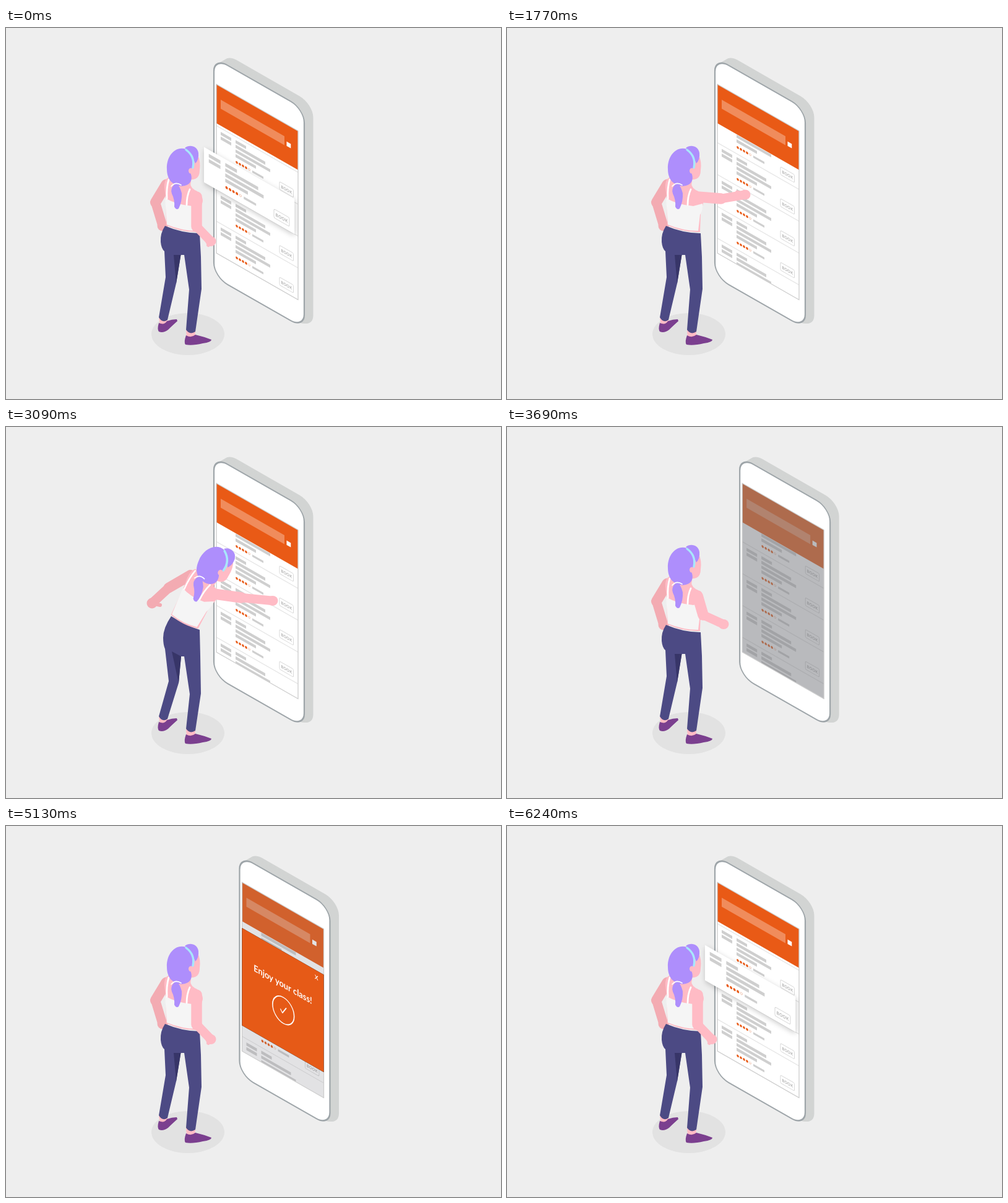
Animation, 800 px wide and 600 px high, one loop 6300 ms. Source, as an HTML page with a canvas:

```html
<!DOCTYPE html>
<html lang="en">
<head>
<meta charset="utf-8">
<title>Booking a class</title>
<style>
html, body { margin: 0; width: 100%; height: 100%; overflow: hidden; background: #eee; }
canvas { display: block; }
</style>
</head>
<body>
<canvas id="stage" width="800" height="600"></canvas>
<script>
const ctx = document.getElementById('stage').getContext('2d');
const LOOP = 6300, STEP = 30;
const SLOPE = 0.572;   // rise of the isometric plane
const ISO = 0.866;     // horizontal foreshortening on that plane
const ROW = 51.5, LIST_TOP = 67, SCREEN_W = 132, SCREEN_H = 273;
const ORANGE = '#e95a16', SKIN = '#ffbbc5', SKIN_DARK = '#f3abb2', PANTS = '#4c4a84',
      PANTS_DARK = '#373568', HAIR = '#ae8efc', SHOE = '#7b3f8f', BAR = '#cfcfcf';

// ---------- timing ----------
const lerp = (a, b, p) => a + (b - a) * p;
const clamp = p => Math.max(0, Math.min(1, p));
const quad = p => p < .5 ? 2 * p * p : 1 - 2 * (1 - p) ** 2;
const cubic = p => p < .5 ? 4 * p ** 3 : 1 - 4 * (1 - p) ** 3;
const ramp = (t, a, b, ease = cubic) => ease(clamp((t - a) / (b - a)));
const pulse = (t, a, b, c, d, ease) => ramp(t, a, b, ease) - ramp(t, c, d, ease);
const outCubic = p => 1 - (1 - p) ** 3;

// keys: [time, ...values]
function track(t, keys) {
  let i = 0;
  while (i < keys.length - 2 && t >= keys[i + 1][0]) i++;
  const a = keys[i], b = keys[i + 1], p = ramp(t, a[0], b[0], quad);
  return a.slice(1).map((v, n) => lerp(v, b[n + 1], p));
}

// ---------- drawing helpers ----------
function fill(d, color) {
  ctx.fillStyle = color;
  ctx.fill(new Path2D(d));
}

function line(d, color, width) {
  ctx.strokeStyle = color;
  ctx.lineWidth = width;
  ctx.lineCap = ctx.lineJoin = 'round';
  ctx.stroke(new Path2D(d));
}

function box(x, y, w, h, color) {
  ctx.fillStyle = color;
  ctx.fillRect(x, y, w, h);
}

function rounded(x, y, w, h, r) {
  ctx.beginPath();
  ctx.roundRect(x, y, w, h, r);
}

function oval(x, y, rx, ry, color) {
  ctx.beginPath();
  ctx.ellipse(x, y, rx, ry, 0, 0, Math.PI * 2);
  ctx.fillStyle = color;
  ctx.fill();
}

function label(text, x, y, font, color, spacing = '0px') {
  ctx.save();
  ctx.translate(x, y);
  ctx.scale(ISO, 1);
  ctx.font = font;
  ctx.letterSpacing = spacing;
  ctx.textAlign = 'center';
  ctx.fillStyle = color;
  ctx.fillText(text, 0, 0);
  ctx.restore();
}

// Draws inside a plane that leans with the phone.
function plane(x, y, scale, draw) {
  ctx.save();
  ctx.transform(scale, SLOPE * scale, 0, scale, x, y);
  draw();
  ctx.restore();
}

// ---------- phone ----------
function drawRow(y) {
  box(7, y + 6, 17, 5, BAR);
  box(7, y + 13.5, 17, 5, BAR);
  [17, 48, 56, 33].forEach((w, i) => box(31, y + 5.5 + i * 7.6, w, 4.9, BAR));
  for (let i = 0; i < 4; i++) oval(33 + i * 5, y + 40.5, 1.8, 2, ORANGE);
  ctx.beginPath();
  ctx.ellipse(53, y + 40.5, 1.5, 1.7, 0, 0, Math.PI * 2);
  ctx.strokeStyle = '#efc0aa';
  ctx.lineWidth = .7;
  ctx.stroke();
  box(58, y + 39, 18, 3.6, BAR);
  rounded(102, y + 32, 22.5, 12.8, 2);
  ctx.fillStyle = '#fff';
  ctx.fill();
  ctx.strokeStyle = '#d6d6d6';
  ctx.lineWidth = .9;
  ctx.stroke();
  label('BOOK', 113.4, y + 41, 'bold 6.4px Lato, sans-serif', '#acacac', '0.4px');
}

function drawScreen(s) {
  ctx.save();
  ctx.beginPath();
  ctx.rect(0, 0, SCREEN_W, SCREEN_H);
  ctx.clip();
  box(0, 0, SCREEN_W, SCREEN_H, '#fff');
  for (let i = 0; i < 7; i++) {
    const y = LIST_TOP + i * ROW - s.scroll;
    if (y > SCREEN_H || y < -ROW) continue;
    box(0, y - .7, SCREEN_W, 1.4, '#e6e6e6');
    if (i !== 1 || s.lift === 0) drawRow(y);
  }
  box(0, 0, SCREEN_W, 63, ORANGE);
  box(7, 21, 103, 14.5, 'rgba(255,255,255,.3)');
  box(113.5, 27.6, 6.8, 7.2, '#fff');
  if (s.dim > 0) box(0, 0, SCREEN_W, SCREEN_H, `rgba(121,123,128,${.52 * s.dim})`);
  ctx.restore();
  ctx.strokeStyle = '#cdcdcd';
  ctx.lineWidth = 1.3;
  ctx.strokeRect(0, 0, SCREEN_W, SCREEN_H);
}

function drawPhone(s) {
  const x = 340 + s.shift, y = 91;
  for (let i = 10; i > 0; i--) {
    const p = i / 10;
    plane(x + 14.5 * p, y - 8.5 * p, 1, () => {
      rounded(-4, -41, 146, 354.5 + 10 * p, 22);
      ctx.fillStyle = '#d2d4d3';
      ctx.fill();
    });
  }
  plane(x, y, 1, () => {
    rounded(-4, -41, 146, 354.5, 22);
    ctx.fillStyle = '#fff';
    ctx.fill();
    ctx.strokeStyle = '#9ea5a9';
    ctx.lineWidth = 2.2;
    ctx.stroke();
    drawScreen(s);
  });
}

function drawCard(s) {
  if (s.lift <= 0) return;
  const x = 340 + s.shift - 20 * s.lift;
  const y = 91 + LIST_TOP + ROW - s.scroll - 17 * s.lift;
  plane(x, y, 1 + .108 * s.lift, () => {
    ctx.save();
    ctx.shadowColor = `rgba(0,0,0,${.21 * s.lift})`;
    ctx.shadowBlur = 8;
    ctx.shadowOffsetX = 1;
    ctx.shadowOffsetY = 3;
    box(0, 0, SCREEN_W, ROW, '#fff');
    ctx.restore();
    drawRow(0);
  });
}

function drawPopup(s) {
  if (s.popAlpha <= 0) return;
  const p = s.popLift, w = SCREEN_W, h = 157.5;
  const x = 340 + s.shift - 36.5 * p, y = 165 - 22 * p, scale = 1 + .113 * p;
  ctx.save();
  ctx.globalAlpha = s.popAlpha;
  for (let i = 4; i > 0 && p > 0; i--) {
    plane(x + .6 * i * p, y - .4 * i * p, scale, () => box(0, 0, w, h, '#596266'));
  }
  plane(x, y, scale, () => {
    box(0, 0, w, h, ORANGE);
    label('Enjoy your class!', 66, 58.5, 'bold 14.8px Lato, sans-serif', '#fff');
    ctx.beginPath();
    ctx.ellipse(66.8, 95, 17.4, 21, 0, 0, Math.PI * 2);
    ctx.strokeStyle = '#fff';
    ctx.lineWidth = 1.6;
    ctx.stroke();
    line('M62.3,95.5L65.2,100L71.3,89', '#fff', 1.4);
    line('M118.2,8.2L122.2,14.2M122.2,8.2L118.2,14.2', '#fff', 1.1);
  });
  ctx.restore();
}

// ---------- woman ----------
function limb(a, b, c, color, upper, lower) {
  line(`M${a}L${b}`, color, upper);
  line(`M${b}L${c}`, color, lower);
}

function drawLegs(p) {
  const m = (x, y, x2, y2) => `${lerp(x, x2, p)},${lerp(y, y2, p)}`;
  fill('M247,469L261,472L260,480L249,481Z', SKIN);
  fill('M291,489L306,491L305,501L292,501Z', SKIN);
  fill('M247,477Q244,487 247,491Q254,494 262,488Q268,482 277,474L276,471Q268,471 260,474Q256,481 247,477Z', SHOE);
  fill('M291,497Q287,508 290,512Q301,514 318,510Q332,508 332,504Q319,499 306,496Q299,502 291,497Z', SHOE);
  const crotch = m(282.5, 367, 283, 371), knee = m(275, 413, 279, 414);
  fill(`M${m(257, 320, 267, 306)}Q${m(249, 332, 254, 325)} ${m(250, 346, 254, 341)}` +
    `Q${m(251, 357, 254, 352)} ${m(256, 361, 257, 359)}L${m(258, 403, 263, 411)}` +
    `L247,468Q253,478 261,472L${knee}L${crotch}L${m(288, 367, 288, 371)}` +
    `L${m(296, 423, 297, 432)}L291,488Q297,497 306,491L${m(316, 422, 315, 431)}` +
    `L${m(315, 370, 314, 370)}L${m(313, 332, 313, 328)}Q${m(285, 332, 290, 321)} ${m(257, 320, 267, 306)}Z`, PANTS);
  fill(`M${m(271, 367, 268, 363)}L${crotch}L${knee}Z`, PANTS_DARK);
}

function drawTorso() {
  fill('M262,242Q255,246 256,258L258,275L259,319Q285,331 312,330L313,300' +
    'L318,280Q318,268 305,262Q296,257 298,245L283,245Q280,250 262,242Z', SKIN);
  fill('M257,275Q276,286 301,288L316,284Q317,294 312,302L309,328Q284,328 260,318Z', '#f5f5f5');
  line('M263,245Q259,258 260,276', '#fff', 2.8);
  line('M297,261Q292,272 292,286', '#fff', 2.8);
}

function drawHead() {
  fill('M282,240L284,251Q291,255 298,255L300,240Z', SKIN);
  fill('M300,206L310,206Q315,216 313,230Q313,241 306,244Q300,246 296,245L295,225Z', SKIN);
  fill('M289,194C296,188 309,190 311,202Q312,213 306,219Q300,204 289,194Z', HAIR);
  fill('M291,196C273,190 259,208 260,228C260,245 269,253 279,255C292,258 303,250 299,237' +
    'L298,233Q302,228 302,218Q301,203 291,196Z', HAIR);
  oval(299, 231, 4, 4.6, SKIN);
  line('M291,197Q306,208 302,226', '#a8e7fb', 3.4);
}

function drawTail() {
  fill('M272,253Q265,260 268,268Q273,278 272,289Q275,295 279,292Q285,280 284,267Q281,256 276,251Z', HAIR);
  line('M267,256Q274,248 283,254', '#fff', 1.6);
}

// Moves an anchor point and turns the drawing around it.
function turned(p, toX, toY, angle, scale, draw) {
  ctx.save();
  ctx.translate(lerp(275, toX, p), lerp(253, toY, p));
  ctx.rotate(angle * p * Math.PI / 180);
  ctx.scale(lerp(1, scale, p), lerp(1, scale, p));
  ctx.translate(-275, -253);
  draw();
  ctx.restore();
}

function drawWoman(s) {
  const p = s.lean;
  const mat = [lerp(1, .927, p), .218 * p, -.478 * p, lerp(1, .973, p), 179 * p, -63.1 * p];
  const onBody = (x, y) => [mat[0] * x + mat[2] * y + mat[4], mat[1] * x + mat[3] * y + mat[5]];
  const mix = (x, y, x2, y2) => [lerp(x, x2, p), lerp(y, y2, p)];

  const backHand = mix(253, 320, 236, 285);
  limb(onBody(259, 253), mix(241.5, 282, 263, 260), backHand, SKIN_DARK, 17, 15);
  oval(...backHand, 8.5, 8.5, SKIN_DARK);
  const thumb = [backHand[0] + lerp(2, 13, p), backHand[1] + lerp(5, 3, p)];
  line(`M${backHand}L${thumb}`, SKIN_DARK, 6);

  drawLegs(p);
  ctx.save();
  ctx.transform(...mat);
  drawTorso();
  ctx.restore();
  turned(p, 315, 246, 24, 1.02, drawHead);
  turned(p, 313, 243, 12, 1, drawTail);

  const [ex, ey, hx, hy] = s.arm;
  limb(onBody(308, 273), [ex, ey], [hx, hy], SKIN, 17.5, 14.5);
  oval(hx, hy, 8.5, 8, SKIN);
  const drop = clamp((hy - 300) / 45);
  line(`M${hx},${hy}L${hx - lerp(13, 4, drop)},${hy + lerp(-4, 6, drop)}`, SKIN, 6);
}

// ---------- scene ----------
const ARM = [
  [0, 308, 321, 331, 345],
  [180, 308, 321, 331, 345],
  [680, 338, 303, 376, 309],
  [1150, 346, 276, 385, 269.5],
  [2130, 346, 276, 385, 269.5],
  [2800, 380, 276, 431, 281],
  [3120, 380, 276, 431, 281],
  [3690, 317, 304, 350, 319],
  [3980, 308, 321, 331, 345],
  [LOOP, 308, 321, 331, 345]
];

function stateAt(t) {
  return {
    lift: 1 - pulse(t, 30, 420, 5930, 6200),
    scroll: 75.5 * (ramp(t, 700, 1650, outCubic) - ramp(t, 5115, 5715, quad)),
    shift: 41.5 * pulse(t, 3330, 3780, 5420, 5930),
    dim: pulse(t, 3200, 3600, 4950, 5280, quad),
    popAlpha: pulse(t, 3850, 4050, 5100, 5460, quad),
    popLift: pulse(t, 3940, 4310, 4800, 5150),
    lean: pulse(t, 2130, 2800, 3120, 3560),
    arm: track(t, ARM)
  };
}

function render(now) {
  const t = Math.min(Math.floor((now % LOOP) / STEP) * STEP, LOOP - 2 * STEP);
  const s = stateAt(t);
  box(0, 0, 800, 600, '#eee');
  oval(294, 495, 59, 34, '#e2e2e2');
  drawPhone(s);
  drawCard(s);
  drawPopup(s);
  drawWoman(s);
}

let start;
function tick(now) {
  if (start === undefined) start = now;
  render(now - start);
  requestAnimationFrame(tick);
}
render(0);
requestAnimationFrame(tick);
</script>
</body>
</html>
```
